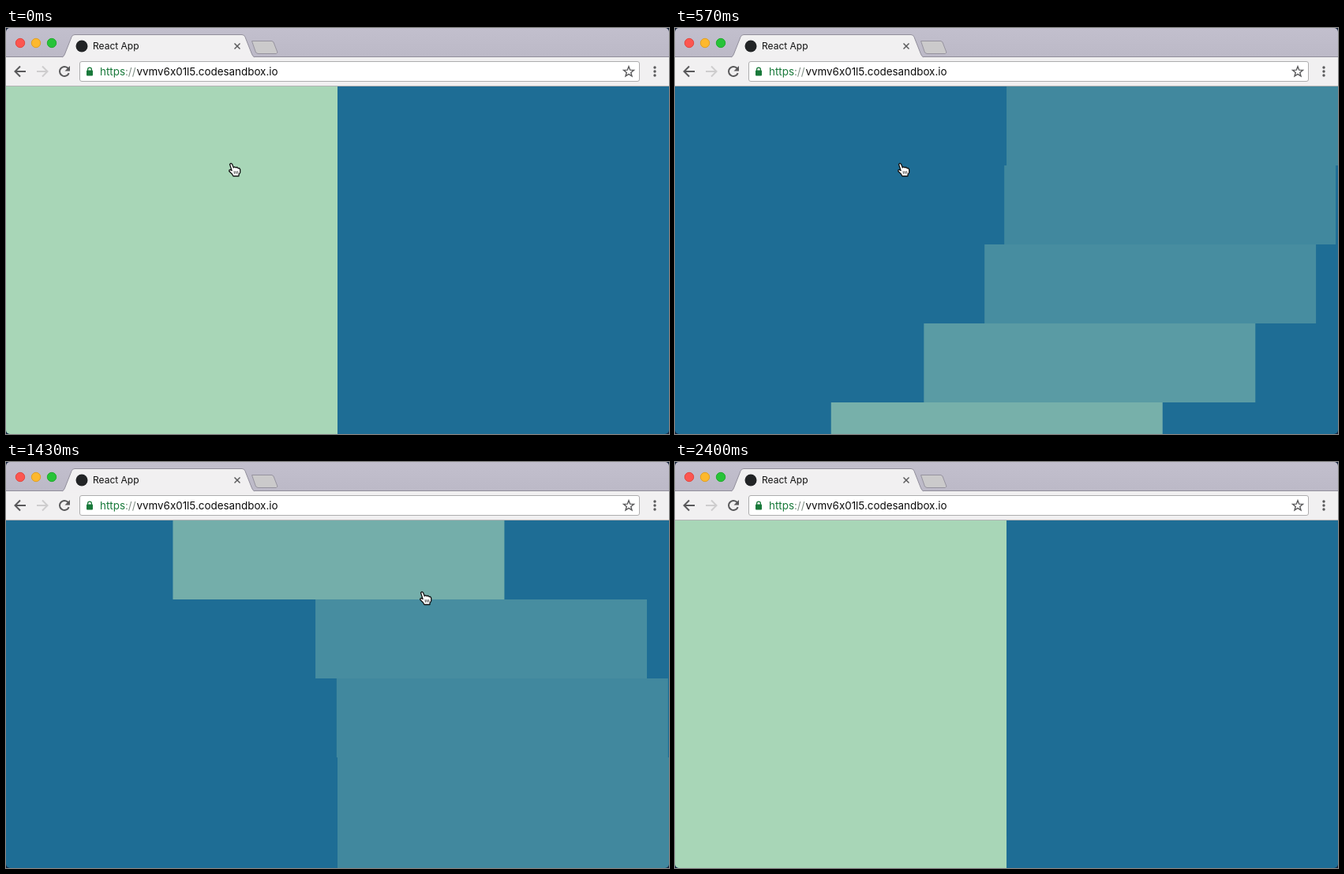
Recreate the animation shown at these times as an HTML page with a canvas. Size 840 by 514 pixels, loop 2560 ms.

```html
<!DOCTYPE html>
<html lang="en">
<head>
<meta charset="utf-8">
<title>Staggered bars</title>
<style>
  html, body { margin: 0; width: 100%; height: 100%; overflow: hidden; background: #14233c; }
  canvas { display: block; }
</style>
</head>
<body>
<canvas id="stage" width="840" height="514"></canvas>
<script>
const ctx = document.getElementById('stage').getContext('2d');
const W = 840, H = 514, LOOP = 2560, STEP = 100 / 3, LAST_STEP = 72;
const TOP = 74, ROW = 100, ROWS = 5, HALF = W / 2;
const TENSION = 519.8, FRICTION = 43, LAG = 6;
const GO_RIGHT = 150, GO_LEFT = 1363;
const FONT = 'Inter, Roboto, sans-serif';

// Chain of springs in 1 ms steps: each row chases the row above it.
function simulate() {
  const rows = [];
  for (let r = 0; r < ROWS; r++) {
    const track = new Float64Array(LOOP + 1);
    let x = 0, v = 0;
    for (let ms = 0; ms <= LOOP; ms++) {
      track[ms] = x;
      const goal = r ? rows[r - 1][Math.max(0, ms - LAG)]
                     : +(ms >= GO_RIGHT && ms < GO_LEFT);
      v += (TENSION * (goal - x) - FRICTION * v) / 1000;
      x += v / 1000;
    }
    rows.push(track);
  }
  return rows;
}
const tracks = simulate();

function shape(points, fill, stroke, width = 1, close = true) {
  ctx.beginPath();
  points.forEach(([x, y]) => ctx.lineTo(x, y));
  if (close) ctx.closePath();
  paint(fill, stroke, width);
}

function paint(fill, stroke, width = 1) {
  if (fill) { ctx.fillStyle = fill; ctx.fill(); }
  if (stroke) { ctx.strokeStyle = stroke; ctx.lineWidth = width; ctx.stroke(); }
}

function disc(x, y, r, fill, stroke) {
  ctx.beginPath();
  ctx.arc(x, y, r, 0, Math.PI * 2);
  paint(fill, stroke);
}

function box(x, y, w, h, r, fill, stroke) {
  ctx.beginPath();
  ctx.roundRect(x, y, w, h, r);
  paint(fill, stroke);
}

function text(str, x, y, size, color) {
  ctx.font = `${size}px ${FONT}`;
  ctx.fillStyle = color;
  ctx.fillText(str, x, y);
  return x + ctx.measureText(str).width;
}

function arrow(x, dir, color) {
  shape([[x - 7 * dir, 55], [x + 6 * dir, 55]], null, color, 2, false);
  shape([[x, 48.5], [x + 6.5 * dir, 55], [x, 61.5]], null, color, 2, false);
}

function drawTabs() {
  const bar = ctx.createLinearGradient(0, 0, 0, 37);
  bar.addColorStop(0, '#c2bfcd');
  bar.addColorStop(1, '#bcb9c7');
  ctx.fillStyle = bar;
  ctx.fillRect(0, 0, W, 37);
  disc(18, 19, 5.7, '#fc5650', '#e2463f');
  disc(38, 19, 5.7, '#fdb82d', '#e0a024');
  disc(58, 19, 5.7, '#27c338', '#1fab2c');

  ctx.fillStyle = '#f1f0f1';
  ctx.fillRect(0, 37, W, 36);
  ctx.fillStyle = '#918e9b';
  ctx.fillRect(0, 36, W, 1);
  ctx.fillStyle = '#b3b3b4';
  ctx.fillRect(0, 73, W, 1);

  ctx.beginPath();
  ctx.moveTo(71, 37);
  ctx.quadraticCurveTo(73.5, 36, 74.5, 33);
  ctx.lineTo(83, 11.5);
  ctx.quadraticCurveTo(84, 8.5, 87, 8.5);
  ctx.lineTo(299, 8.5);
  ctx.quadraticCurveTo(302, 8.5, 303, 11.5);
  ctx.lineTo(311.5, 33);
  ctx.quadraticCurveTo(312.5, 36, 315, 37);
  paint('#f1f0f1', '#918e9b');
  ctx.fillStyle = '#f1f0f1';
  ctx.fillRect(73, 36.5, 240, 2);

  disc(96, 23, 7.5, '#222426');
  text('React App', 110, 27, 12, '#111');
  shape([[289.5, 19.5], [296.5, 26.5]], null, '#5b5b5d', 1.5, false);
  shape([[296.5, 19.5], [289.5, 26.5]], null, '#5b5b5d', 1.5, false);
  shape([[311.5, 16.5], [337, 16.5], [339, 18], [344, 31], [342.5, 32.5],
         [319, 32.5], [316.5, 31]], '#cbcacb', '#96939f');
}

function drawToolbar() {
  arrow(18, -1, '#59595b');
  arrow(46, 1, '#cecdce');

  ctx.beginPath();
  ctx.arc(74, 55, 6, 0.35, Math.PI * 1.78);
  paint(null, '#59595b', 2);
  shape([[81, 48], [81, 54.5], [74.5, 54.5]], '#59595b');

  box(93.5, 42.5, 709, 25, 2.5, '#fff', '#adadae');
  box(102, 53.5, 8, 7, 1, '#18793a');
  ctx.beginPath();
  ctx.arc(106, 52.5, 2.4, Math.PI, 0);
  ctx.lineTo(108.4, 54);
  ctx.moveTo(103.6, 52.5);
  ctx.lineTo(103.6, 54);
  paint(null, '#18793a', 1.3);

  const size = 13.4;
  const end = text('https', 119, 60, size, '#18793a');
  text('://', end, 60, size, '#7b8b80');
  text('vvmv6x01l5.codesandbox.io', 165.5, 60, size, '#0b0b0b');

  const star = Array.from({ length: 10 }, (_, i) => {
    const a = i * Math.PI / 5 - Math.PI / 2, r = i % 2 ? 2.9 : 6.8;
    return [789 + r * Math.cos(a), 55.5 + r * Math.sin(a)];
  });
  shape(star, null, '#59595b', 1.4);
  for (const y of [50, 55, 60]) disc(822, y, 1.7, '#59595b');
}

function drawRows(ms) {
  ctx.fillStyle = '#1e6d95';
  ctx.fillRect(0, TOP, W, H - TOP);
  ctx.fillStyle = '#a8d6b7';
  tracks.forEach((track, r) => {
    const p = track[Math.round(ms)];
    ctx.globalAlpha = Math.min(1, 1 - 0.75 * p);
    ctx.fillRect(p * HALF, TOP + r * ROW, HALF, ROW);
  });
  ctx.globalAlpha = 1;
}

function drawHand(x, y) {
  ctx.save();
  ctx.translate(x, y);
  ctx.lineJoin = 'round';
  shape([[-6, -6.5], [-4.5, -7.7], [-3, -6.8], [-1.2, -2.2], [0.2, -3.2], [1.8, -2.2],
         [3.2, -2.8], [4.6, -1.4], [6, -1.6], [7.2, 0.2], [7.2, 4], [5.6, 6.4], [5.4, 8.5],
         [-1.6, 8.5], [-3, 6], [-6.8, 2.2], [-6.4, 0.6], [-5, 0.4], [-3.4, 1.6]],
        '#fff', '#111', 1.3);
  for (const dx of [-0.4, 1.8, 4]) {
    shape([[dx, 2.2], [dx + 0.4, 5.6]], null, '#222', 0.9, false);
  }
  ctx.restore();
}

function drawCursor(ms) {
  if (ms >= 1700) return;
  const p = Math.min(1, Math.max(0, (ms - 700) / 380));
  const e = p * p * (3 - 2 * p);
  const drift = Math.min(1, Math.max(0, (ms - 1140) / 200));
  drawHand(289.5 + 240 * e + 2 * drift, 179 - 8 * e + drift);
}

function draw(now) {
  const t = now % LOOP;
  const ms = Math.min(LAST_STEP, Math.floor((t + 3.4) / STEP)) * STEP;
  ctx.fillStyle = '#14233c';
  ctx.fillRect(0, 0, W, H);
  ctx.save();
  ctx.beginPath();
  ctx.roundRect(0, 0, W, H, 5);
  ctx.clip();
  drawTabs();
  drawToolbar();
  drawRows(ms);
  drawCursor(ms);
  ctx.restore();
}

const start = performance.now();
function tick() {
  draw(performance.now() - start);
  requestAnimationFrame(tick);
}
tick();
</script>
</body>
</html>
```
